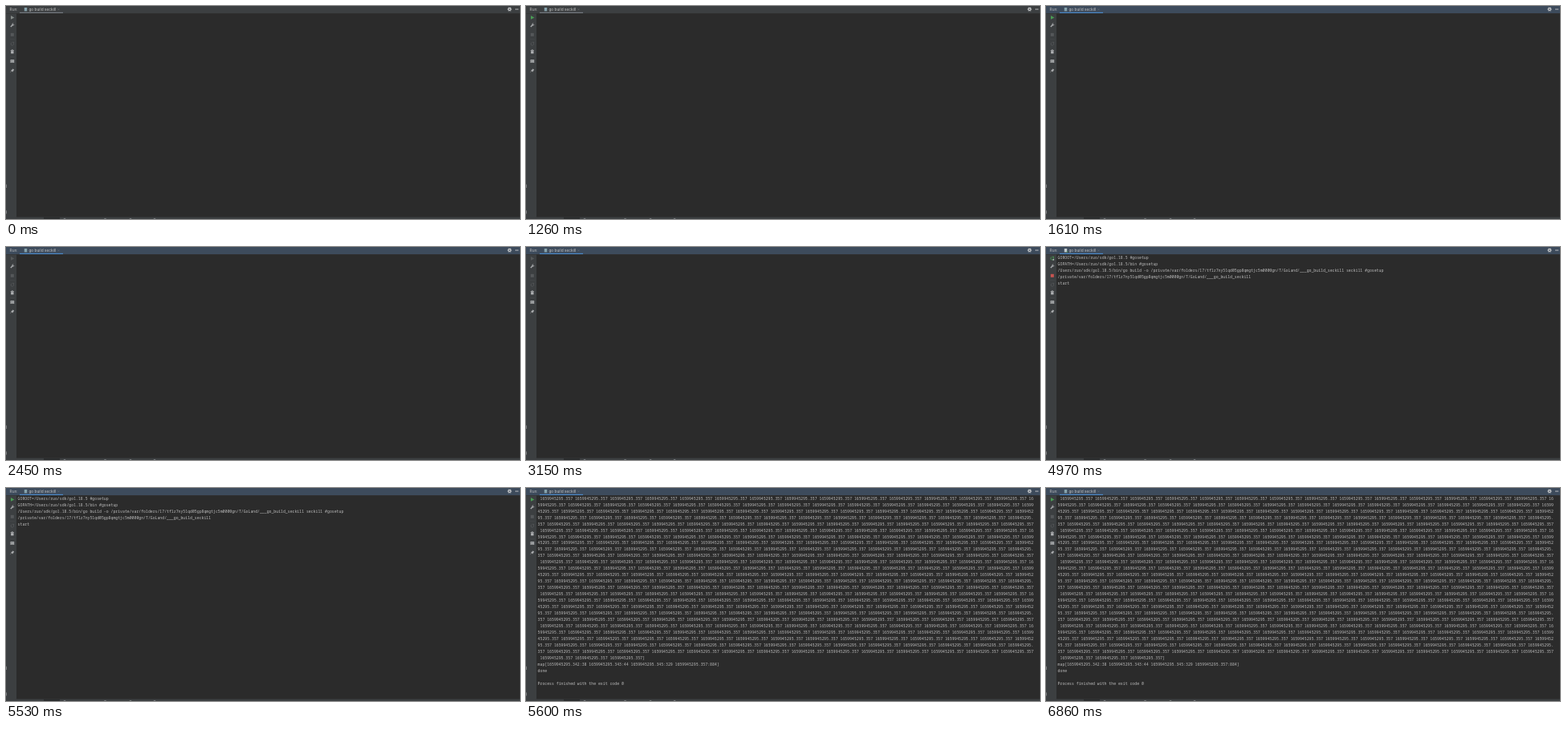
Recreate the animation shown at these times as an HTML page with a canvas. Size 640 by 266 pixels, loop 8 s.

```html
<!DOCTYPE html>
<html lang="en">
<head>
<meta charset="utf-8">
<title>Run console</title>
<style>
html, body { margin: 0; width: 100%; height: 100%; overflow: hidden; background: #2b2b2b; }
canvas { display: block; }
</style>
</head>
<body>
<canvas id="stage" width="640" height="266"></canvas>
<script>
const ctx = document.getElementById('stage').getContext('2d');
const LOOP = 8000;
const AT = { hover: 70, focus: 1540, build: 1960, start: 4200, exit: 5250, flush: 5600 };
const MONO = '"Noto Sans Mono", "DejaVu Sans Mono", monospace';
const SANS = 'Inter, Roboto, sans-serif';
const PANEL = '#3c3f41', ICON = '#afb1b3', DIM = '#55585a', GREEN = '#499c54', RED = '#c75450';
const COLS = 213, ROW = 7.97, TOP = 13.1;

const setup = [
  'GOROOT=/Users/ruo/sdk/go1.18.5 #gosetup',
  'GOPATH=/Users/ruo/sdk/go1.18.5/bin #gosetup',
  '/Users/ruo/sdk/go1.18.5/bin/go build -o /private/var/folders/17/tflz7ny51qd05gp8qmgtjc5m0000gn/T/GoLand/___go_build_seckill seckill #gosetup',
  '/private/var/folders/17/tflz7ny51qd05gp8qmgtjc5m0000gn/T/GoLand/___go_build_seckill',
  'start'
];
const wrap = s => s.match(new RegExp(`.{1,${COLS}}`, 'g'));
const output = [
  ...wrap(' 1659945295.357'.repeat(358) + ']'),
  'map[1659945295.342:38 1659945295.343:44 1659945295.345:329 1659945295.357:884]',
  'done',
  '',
  'Process finished with the exit code 0'
];

function rect(x, y, w, h, color) {
  ctx.fillStyle = color;
  ctx.fillRect(x, y, w, h);
}

// Set at ten times the size and scaled down to keep fractional advances.
function text(s, x, y, size, family, color) {
  ctx.save();
  ctx.translate(x, y);
  ctx.scale(0.1, 0.1);
  ctx.font = `${size * 10}px ${family}`;
  ctx.textBaseline = 'alphabetic';
  ctx.fillStyle = color;
  ctx.fillText(s, 0, 0);
  ctx.restore();
}

function poly(points, color) {
  ctx.fillStyle = color;
  ctx.beginPath();
  points.forEach(([x, y]) => ctx.lineTo(x, y));
  ctx.closePath();
  ctx.fill();
}

function line(points, color, width) {
  ctx.strokeStyle = color;
  ctx.lineWidth = width;
  ctx.beginPath();
  points.forEach(([x, y]) => ctx.lineTo(x, y));
  ctx.stroke();
}

function arc(x, y, r, color, width, from = 0, to = Math.PI * 2) {
  ctx.strokeStyle = color;
  ctx.lineWidth = width;
  ctx.beginPath();
  ctx.arc(x, y, r, from, to);
  ctx.stroke();
}

function dot(x, y, r, color) {
  ctx.fillStyle = color;
  ctx.beginPath();
  ctx.arc(x, y, r, 0, Math.PI * 2);
  ctx.fill();
}

function header(focused, running) {
  rect(0, 0, 640, 9, focused ? '#3d4b5c' : PANEL);
  rect(0, 9, 640, 0.6, '#323232');
  rect(17, 7.8, 54, 1.2, focused ? '#4a88c7' : '#747a80');
  text('Run:', 4.6, 6, 4.8, SANS, '#bbbbbb');
  rect(22.8, 2, 3.4, 4.4, running ? '#c2ccd0' : '#86a3ad');
  if (running) dot(26.4, 6, 0.8, GREEN);
  text('go build seckill', 28.4, 6, 4.8, SANS, '#c4c4c4');
  line([[64.6, 3.4], [66.4, 5.2]], '#777b7e', 0.4);
  line([[66.4, 3.4], [64.6, 5.2]], '#777b7e', 0.4);
  arc(627, 4, 1.5, '#c4c6c8', 1.3);
  for (let i = 0; i < 6; i++) {
    const a = i * Math.PI / 3;
    dot(627 + 2.2 * Math.cos(a), 4 + 2.2 * Math.sin(a), 0.5, '#c4c6c8');
  }
  rect(634, 3.6, 4.2, 0.9, '#c4c6c8');
}

function rerun(x, y, color) {
  arc(x, y, 1.8, color, 0.8, -0.4, Math.PI * 1.45);
  poly([[x + 0.2, y - 2.6], [x + 2.5, y - 2.4], [x + 1.5, y - 0.4]], color);
}

function tools(play, running) {
  if (running) {
    rerun(7.6, 14.3, GREEN);
    rect(8.4, 15, 1.7, 1.7, ICON);
  } else {
    poly([[6, 12], [10.4, 14.4], [6, 16.8]], play);
  }
  // wrench
  line([[5.8, 26], [8.6, 23.3]], ICON, 1.3);
  arc(8.9, 22.9, 1.1, ICON, 0.9, 0.1, Math.PI * 1.6);
  rect(5.8, 33.8, 4, 4, running ? RED : DIM);
  rect(5, 41.2, 6, 0.4, '#4b4e50');
  rerun(7.8, 47.4, DIM);
  // bin
  rect(5.7, 55, 4.2, 0.8, ICON);
  rect(7, 54.4, 1.6, 0.7, ICON);
  rect(6.1, 56.2, 3.4, 3.2, ICON);
  rect(5, 63.2, 6, 0.4, '#4b4e50');
  // layout
  rect(5.5, 67, 4.7, 4, ICON);
  rect(6, 68.5, 2, 0.5, PANEL);
  rect(8.3, 68.5, 1.4, 0.5, PANEL);
  rect(6, 70, 3.7, 0.4, PANEL);
  // pin
  line([[5.6, 82.7], [7.4, 80.9]], ICON, 0.6);
  poly([[6, 79.9], [7.9, 79.5], [8.6, 78.2], [10.3, 79.9], [9, 80.8], [8.5, 82.4]], ICON);
}

function frame() {
  rect(0, 9, 13, 257, PANEL);
  rect(0, 222.8, 0.8, 4.2, '#8c8e90');
  rect(0, 255.4, 0.8, 4, '#8c8e90');
  rect(0, 263.5, 640, 2.5, PANEL);
  rect(47, 263.7, 20, 2.3, '#2a2c2d');
  [73, 123.5, 155, 185].forEach(x => rect(x - 1.2, 265, 2.4, 1, '#75787a'));
}

function consoleText(rows) {
  rows.forEach((s, i) => text(s, 14.6, TOP + i * ROW + 1.6, 4.83, MONO, '#bcbcbc'));
}

function draw(t) {
  const running = t >= AT.start && t < AT.exit;
  const building = t >= AT.build && t < AT.start;
  const play = building ? DIM : t < AT.hover ? '#858b88' : GREEN;
  rect(0, 0, 640, 266, '#2b2b2b');
  frame();
  header(t >= AT.focus, running);
  tools(play, running);
  if (t >= AT.flush) consoleText(output);
  else if (t >= AT.start) consoleText(setup);
}

const begin = performance.now();
function tick() {
  draw((performance.now() - begin) % LOOP);
  requestAnimationFrame(tick);
}
tick();
</script>
</body>
</html>
```
